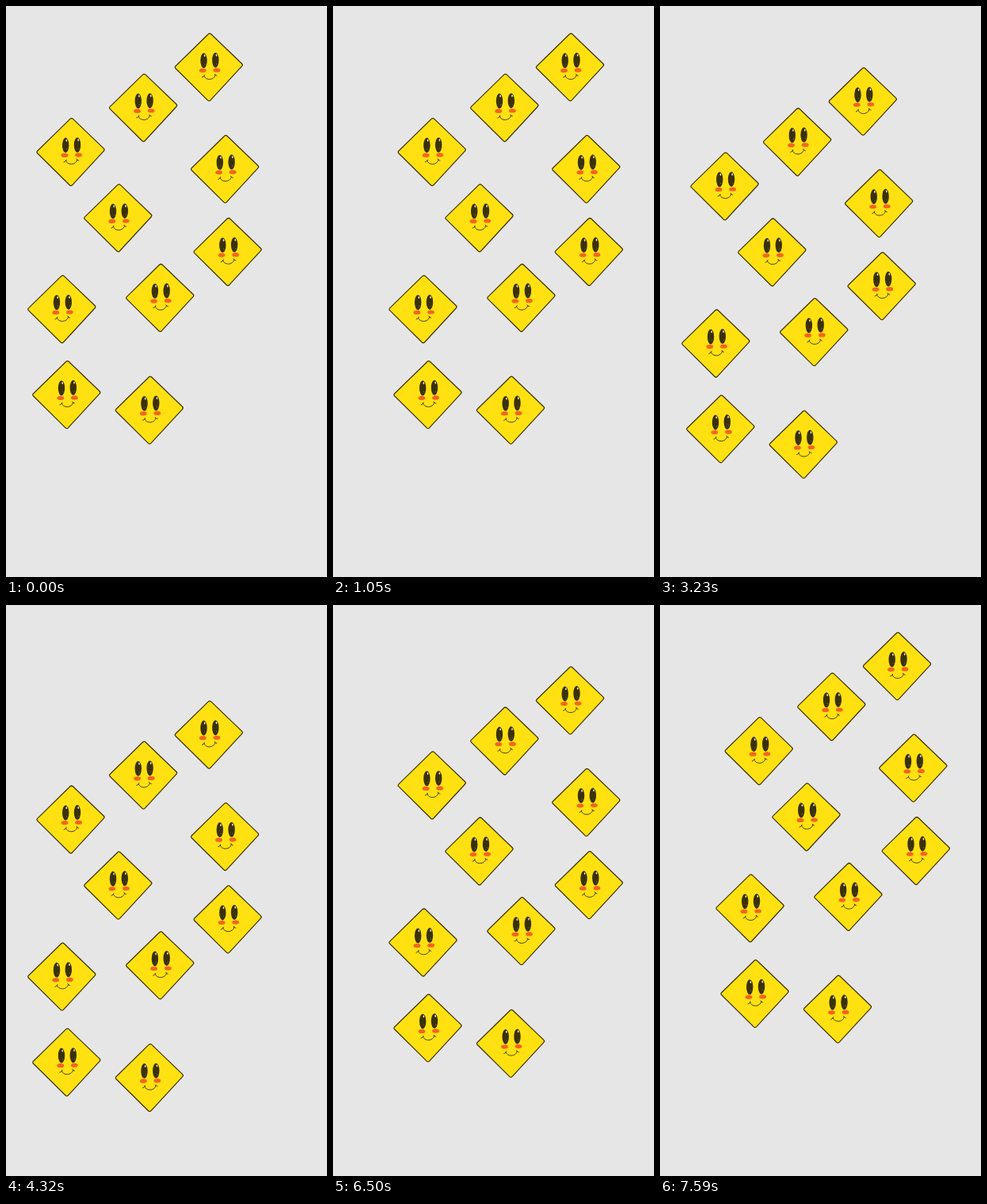
Animation, 405 px wide and 720 px high, one loop 8.68 s. Source, as an HTML page with a canvas:

```html
<!DOCTYPE html>
<html lang="en">
<head>
<meta charset="utf-8">
<title>Smiling diamonds</title>
<style>
  html, body { margin: 0; width: 100%; height: 100%; overflow: hidden; background: #e6e6e6; }
  canvas { display: block; width: 405px; height: 720px; }
</style>
</head>
<body>
<canvas id="stage"></canvas>
<script>
const W = 405, H = 720;
const FIRST = 1050, HOLD = 1090, LOOP = 8680, STEP = 43.2;
const INK = '#3a310b', YELLOW = '#ffe112', CHEEK = '#f4641f';

// Hand-placed scatter: top left corner of each diamond at rest
const spots = [
  [212.6, 33.9], [129.9, 85], [38.3, 140.8], [232.9, 162.4], [98.1, 224],
  [236.4, 266.7], [151, 324.7], [27.1, 339], [33.1, 446.9], [137.6, 466.4]
];
const outline = new Path2D(
  'M42.6 1.6Q44.4 0 46.2 1.6L85 38.8Q86.6 40.4 85 42' +
  'L45.3 85Q43.6 86.6 41.9 85L1.4 44.9Q-.2 43.4 1.4 41.9Z');
const smile = new Path2D(
  'M37.2 53.9C38.2 60.2 50.2 60.6 51.6 52.9' +
  'M34.8 56.1Q37.2 55.6 38 53.3M50.6 52.2Q51.5 54 53.4 54.2');

const canvas = document.getElementById('stage');
const ctx = canvas.getContext('2d');
const dpr = window.devicePixelRatio || 1;
canvas.width = W * dpr;
canvas.height = H * dpr;

function oval(x, y, rx, ry, color) {
  ctx.fillStyle = color;
  ctx.beginPath();
  ctx.ellipse(x, y, rx, ry, 0, 0, Math.PI * 2);
  ctx.fill();
}

function halfFace(side) {
  const x = 44.3 + side * 7.4;
  const y = 34.6 - side * 0.2;
  oval(x, y, 4.2, 9.5, INK);
  oval(x + 1.2, y - 6.2, 0.8, 1.5, '#f3efdc');
  oval(x + 1.3, y + 4.6, 0.5, 0.6, '#8d8038');
  oval(44.5 + side * 8.8, y + 12.6, 4.4, 2.6, CHEEK);
}

function diamond(x, y) {
  ctx.save();
  ctx.translate(x, y);
  ctx.strokeStyle = INK;
  ctx.lineCap = 'round';
  ctx.fillStyle = YELLOW;
  ctx.fill(outline);
  ctx.lineWidth = 1.2;
  ctx.stroke(outline);
  halfFace(-1);
  halfFace(1);
  ctx.lineWidth = 0.9;
  ctx.stroke(smile);
  ctx.restore();
}

// The group zigzags down three rows, then climbs back up the right side.
function groupOffset(i) {
  const col = (Math.min(i, 5) + 1 >> 1) % 2;
  const row = Math.min(i >> 1, 7 - i);
  return [col * STEP, row * STEP];
}

function draw(time) {
  const t = time % LOOP;
  const [dx, dy] = groupOffset(Math.floor((t - FIRST) / HOLD) + 1);
  ctx.setTransform(dpr, 0, 0, dpr, 0, 0);
  ctx.fillStyle = '#e6e6e6';
  ctx.fillRect(0, 0, W, H);
  for (const [x, y] of spots) diamond(x + dx, y + dy);
}

const start = performance.now();
function tick() {
  draw(Math.max(0, performance.now() - start));
  requestAnimationFrame(tick);
}
tick();
</script>
</body>
</html>
```
